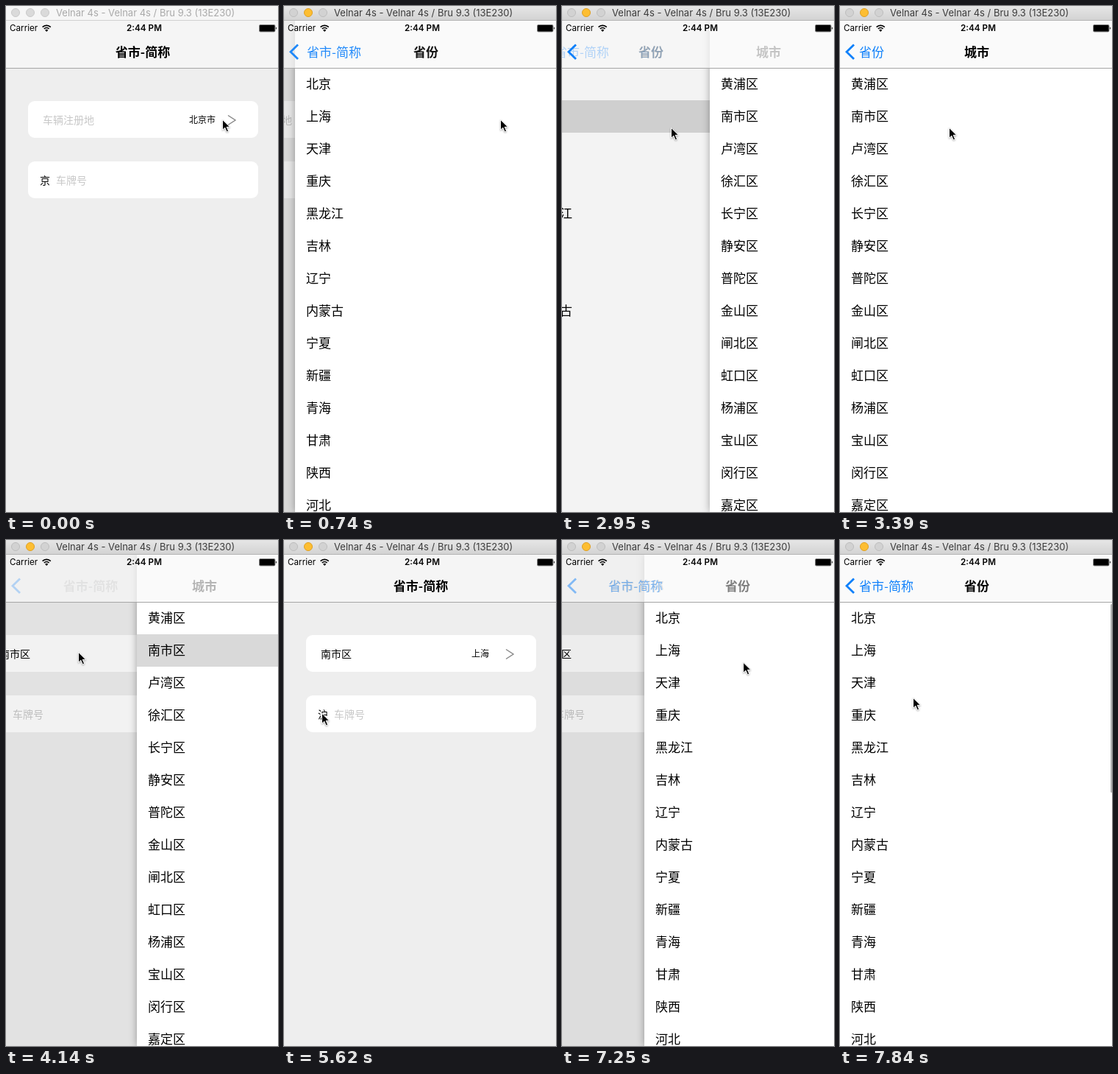
An HTML page for the animation above (7.99 s loop, 370 by 687 pixels).

```html
<!DOCTYPE html>
<html lang="zh-CN">
<head>
<meta charset="utf-8">
<title>省市-简称</title>
<style>
html, body { margin: 0; width: 100%; height: 100%; overflow: hidden; background: #eee; }
#stage { position: relative; width: 370px; height: 687px; overflow: hidden; color: #000;
  font: 17px "Noto Sans CJK SC", "Noto Sans CJK", sans-serif; }
#stage div, #stage svg { position: absolute; white-space: nowrap; }
.page { left: 0; top: 20px; width: 370px; height: 667px; background: #fff; }
.page.over { box-shadow: 0 0 10px rgba(0,0,0,.34); }
.dim { inset: 0; background: #000; }
.row { left: 0; width: 355px; height: 44px; padding-left: 15px; line-height: 42px; }
.card { left: 30px; width: 313px; height: 50px; border-radius: 9px; background: #fff; font-size: 14px; line-height: 50px; }
.hint { color: #c8c8c8; }
#place { left: 20px; }
#city { left: 197px; width: 80px; text-align: center; font-size: 12px; }
#bar { left: 0; top: 20px; width: 370px; height: 64px; background: rgba(248,248,248,.706); border-bottom: 1px solid #a6a6a6; }
.head { left: 86px; top: 48px; width: 200px; line-height: 28px; text-align: center; font-weight: 700; }
.back { left: 26px; top: 48px; line-height: 28px; color: #0f80fa; }
#flash { left: 368px; top: 87px; width: 3px; height: 256px; border-radius: 2px; background: #b4b4b4; }
#win { left: 0; top: 0; width: 370px; height: 19px; border-bottom: 1px solid #d0d0d0; background: #f6f6f6; }
#win.on { background: linear-gradient(#e6e6e6, #d3d3d3); border-color: #b4b4b4; }
#win i { position: absolute; top: 3px; width: 10px; height: 10px; border-radius: 50%; background: #dadada; border: 1px solid #c9c9c9; }
#win.on i { background: #d2d2d2; border-color: #bdbdbd; }
#win.on .amber { background: #fdbe32; border-color: #dfa023; }
#name { left: 68px; top: 0; color: #a9a9a9; font: 13px/19px Inter, sans-serif; }
#win.on #name { color: #3c3c3c; }
.status { top: 22px; font: 11.7px/17px Inter, sans-serif; }
#clock { left: 138px; width: 100px; text-align: center; font-weight: 600; }
</style>
</head>
<body>
<div id="stage">
  <div class="page" id="root" style="background:#eee">
    <div class="card" style="top:109px">
      <div id="place"></div><div id="city"></div>
      <svg style="left:271px;top:18px" width="13" height="16" fill="none" stroke="#858585" stroke-width="1.4"><path d="M1 1.5 L11 8 L1 14.5"/></svg>
    </div>
    <div class="card" style="top:191px">
      <div id="plate" style="left:16px"></div><div class="hint" style="left:38px">车牌号</div>
    </div>
    <div class="dim"></div>
  </div>
  <div class="page over" id="prov"></div>
  <div class="page over" id="town"></div>
  <div id="bar"></div>
  <div id="flash"></div>
  <svg id="chev" style="left:6px;top:50px" width="16" height="25" fill="none" stroke="#0f80fa" stroke-width="2.8"><path d="M13 2.5 L3 12.3 L13 22.1"/></svg>
  <div class="status" style="left:5px">Carrier</div>
  <svg style="left:48px;top:24px" width="15" height="12" fill="none" stroke="#000" stroke-width="1.7">
    <path d="M1.6 4.6 A8 8 0 0 1 12.8 4.6 M3.8 7 A4.9 4.9 0 0 1 10.6 7"/><path d="M7.2 11 L5.1 8.8 A3 3 0 0 1 9.3 8.8 Z" fill="#000" stroke="none"/>
  </svg>
  <div class="status" id="clock">2:44 PM</div>
  <svg style="left:344px;top:25px" width="26" height="11">
    <rect x=".5" y=".5" width="21.5" height="9.5" rx="1.5" fill="#000" stroke="#8c8c8c"/><path d="M23 3.5 Q25 5.2 23 7 Z"/>
  </svg>
  <div id="win">
    <i style="left:7px"></i><i class="amber" style="left:27px"></i><i style="left:47px"></i>
    <div id="name">Velnar 4s - Velnar 4s / Bru 9.3 (13E230)</div>
  </div>
  <svg id="mouse" style="left:0;top:0;overflow:visible;filter:drop-shadow(0 1px 1px rgba(0,0,0,.35))" width="14" height="20">
    <path d="M.5 .3 V14.2 L3.8 11.2 L6.2 16.8 L8.6 15.8 L6.2 10.3 H10.6 Z" fill="#000" stroke="#fff" stroke-width="1"/>
  </svg>
</div>
<script>
const $ = id => document.getElementById(id);
const LOOP = 7990, TICK = LOOP / 54, LEAD = 20;

const lists = {
  prov: '北京 上海 天津 重庆 黑龙江 吉林 辽宁 内蒙古 宁夏 新疆 青海 甘肃 陕西 河北',
  town: '黄浦区 南市区 卢湾区 徐汇区 长宁区 静安区 普陀区 金山区 闸北区 虹口区 杨浦区 宝山区 闵行区 嘉定区'
};

// slide: how far a title travels to become the next page's back label
const pages = [
  { id: 'root', title: '省市-简称', slide: -122 },
  { id: 'prov', title: '省份', back: '省市-简称', slide: -143 },
  { id: 'town', title: '城市', back: '省份', slide: 0 }
];

// at: tick, lag: ms already elapsed at that tick
const moves = [
  { at: 3, lag: 60, low: 0, high: 1 },
  { at: 20, lag: 110, low: 1, high: 2 },
  { at: 28, lag: 115.6, low: 0, high: 2, pop: true },
  { at: 48, lag: 25, low: 0, high: 1 }
];

// pointer: tick, x, y
const track = [
  [0, 294, 154], [6, 294, 154], [10, 246, 143], [15, 170, 127], [16, 170, 127],
  [18, 148, 165], [23, 148, 165], [26, 98, 152], [33, 98, 152],
  [38, 51, 235], [39, 51, 242], [40, 51, 242], [46, 283, 154], [48, 283, 154], [53, 99, 214]
];

function add(parent, cls, text) {
  const el = document.createElement('div');
  el.className = cls;
  el.textContent = text;
  parent.append(el);
  return el;
}

const nav = document.createElement('div');
$('bar').after(nav);

for (const page of pages) {
  page.el = $(page.id);
  if (lists[page.id]) {
    page.rows = lists[page.id].split(' ').map((text, i) => {
      const row = add(page.el, 'row', text);
      row.style.top = 64 + 44 * i + 'px';
      return row;
    });
    add(page.el, 'dim', '');
  }
  page.dim = page.el.querySelector('.dim');
  page.head = add(nav, 'head', page.title);
  page.label = add(nav, 'back', page.back || '');
}
nav.style.cssText = 'left:0;top:0';

function put(el, x, alpha) {
  el.style.transform = `translateX(${Math.round(x)}px)`;
  el.style.opacity = alpha;
}

function spring(ms) {
  if (ms > 500) return 1;
  const s = ms * 0.014;
  return 1 - (1 + s) * Math.exp(-s);
}

function pointer(n) {
  const i = Math.max(1, track.findIndex(k => k[0] >= n));
  const [t0, x0, y0] = track[i - 1], [t1, x1, y1] = track[i];
  const f = (n - t0) / (t1 - t0);
  return [x0 + (x1 - x0) * f, y0 + (y1 - y0) * f];
}

function showMove(move, n) {
  const p = move ? spring((n - move.at) * TICK + move.lag) : 0;
  const { low, high, pop } = move || moves[0];
  const q = pop ? 1 - p : p;
  const a = pages[low], b = pages[high];
  for (const page of pages) {
    page.el.style.display = page === a && q < 1 || page === b && q > 0 ? '' : 'none';
    page.dim.style.opacity = 0;
    put(page.head, 0, 0);
    put(page.label, 0, 0);
  }
  put(a.el, -114 * q, 1);
  put(b.el, 370 * (1 - q), 1);
  a.dim.style.opacity = 0.1 * q;

  put(a.head, (pop ? -137 : a.slide) * q, (1 - q) ** (pop ? 4 : 2));
  put(a.label, -80 * q, (1 - q) ** 2);
  put(b.head, 175 * (1 - q), q * q);
  put(b.label, -pages[high - 1].slide * (1 - q), q ** (pop ? 8 : 2));
  $('chev').style.opacity = low ? 1 : q * q;
}

function render(n) {
  showMove(moves.filter(m => m.at <= n).pop(), n);

  const chosen = n >= 28;
  $('place').textContent = chosen ? '南市区' : '车辆注册地';
  $('place').className = chosen ? '' : 'hint';
  $('city').textContent = chosen ? '上海' : '北京市';
  $('plate').textContent = chosen ? '沪' : '京';
  pages[1].rows[1].style.background = n >= 20 && n < 28 ? '#d9d9d9' : '';
  pages[2].rows[1].style.background = chosen ? '#d9d9d9' : '';

  $('win').className = n >= 3 ? 'on' : '';
  $('flash').style.opacity = n >= 52 || n >= 7 && n < 12 ? 1 : n === 12 ? 0.5 : 0;
  const [x, y] = pointer(n);
  $('mouse').style.transform = `translate(${x}px, ${y}px)`;
}

const start = performance.now();
function frame() {
  const t = (performance.now() - start) % LOOP;
  render(Math.min(53, Math.floor((t + LEAD) / TICK)));
  requestAnimationFrame(frame);
}
frame();
</script>
</body>
</html>
```
